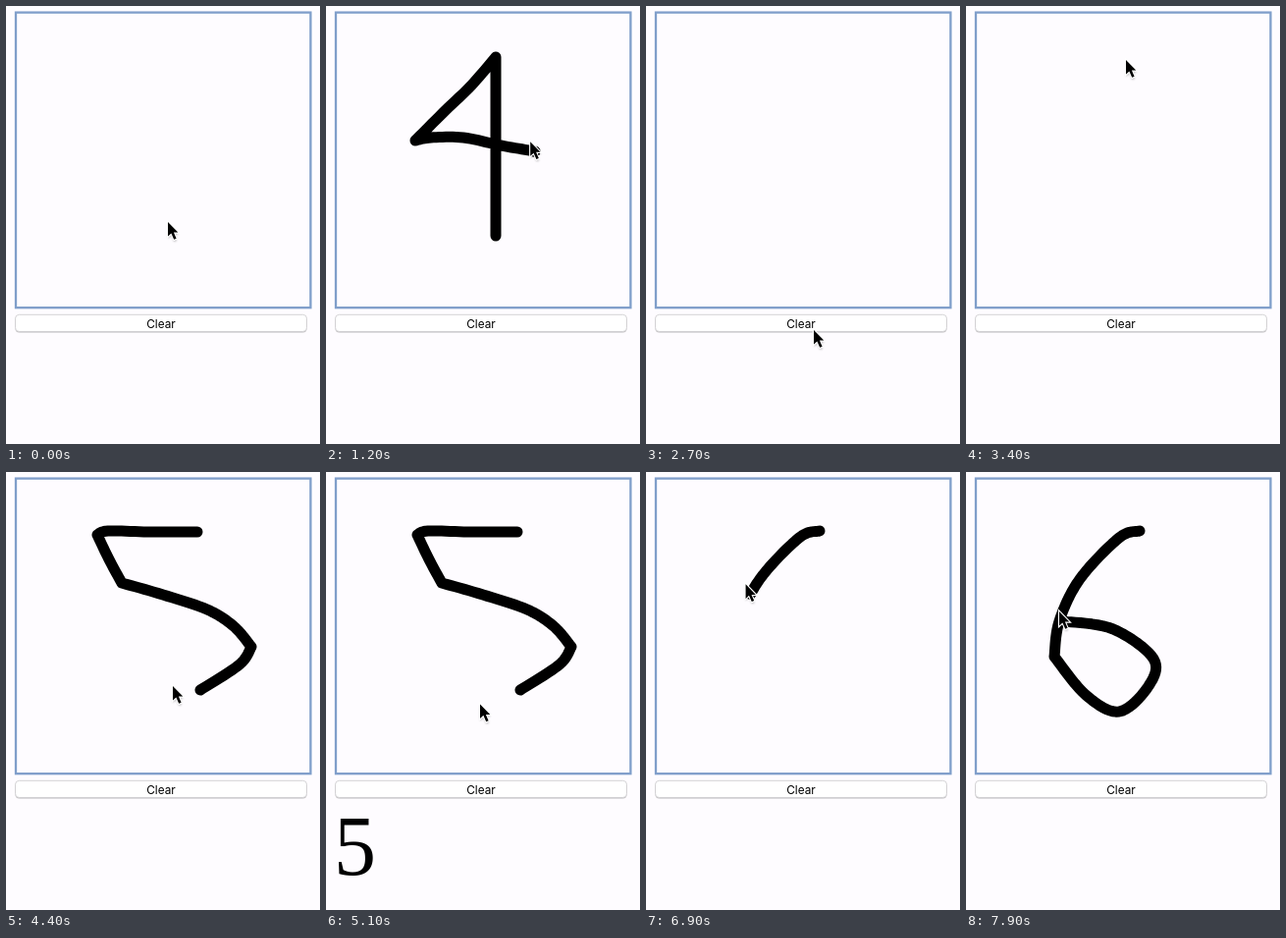
These frames come from a looping animation (320x446 px, 8 s). An HTML page:

```html
<!DOCTYPE html>
<html lang="en">
<head>
<meta charset="utf-8">
<title>Digit pad</title>
<style>
  html, body { margin: 0; width: 100%; height: 100%; overflow: hidden; background: #fefcff; }
  svg { display: block; width: 100vw; height: 100vh; }
  .label { font: 11.8px Inter, "Open Sans", sans-serif; text-anchor: middle; }
  .guess { font: 86px "Liberation Serif", "Times New Roman", serif; }
</style>
</head>
<body>
<svg viewBox="0 0 320 446">
  <defs>
    <linearGradient id="press" x2="0" y2="1">
      <stop stop-color="#62a8f8"/>
      <stop offset="1" stop-color="#1768e6"/>
    </linearGradient>
    <filter id="soft" x="-50%" y="-50%" width="200%" height="200%">
      <feGaussianBlur stdDeviation="1"/>
    </filter>
  </defs>
  <rect width="320" height="446" fill="#fefcff"/>
  <rect x="10" y="6.6" width="300.4" height="300.6" fill="none" stroke="#7f9eca" stroke-width="2.3"/>
  <path id="ink" fill="none" stroke="#000" stroke-width="11" stroke-linecap="round" stroke-linejoin="round"/>
  <rect x="9.5" y="315" width="297" height="17.5" rx="4" fill="#bcbbbd"/>
  <rect id="button" x="9.5" y="314.3" width="297" height="17.2" rx="4" fill="#fff" stroke="#d0cfd1" stroke-width=".9"/>
  <text id="label" class="label" x="158" y="327.6">Clear</text>
  <text id="guess" class="guess" x="8" y="410.3"></text>
  <g id="cursor">
    <path d="M0 2V17L3.6 13.5L6.4 20L9 19L6.2 12.6H11Z" opacity=".3" filter="url(#soft)"/>
    <path d="M0 0V14.6L3.4 11.4L6.2 17.8L8.6 16.8L5.9 10.6H10.3Z" stroke="#fff" stroke-width="2.2" paint-order="stroke"/>
  </g>
</svg>
<script>
const LOOP = 8000, STEP = 100;
const PEN = [5, 10]; // pen tip relative to the pointer
const $ = id => document.getElementById(id);
const clamp = u => Math.min(1, Math.max(0, u));
const easeOut = u => Math.sin(u * Math.PI / 2);
const smooth = u => u * u * (3 - 2 * u);

// Catmull-Rom point; the whole part of pos is the index of the key point
function spline(pts, pos) {
  const i = Math.min(Math.floor(pos), pts.length - 2), u = pos - i;
  const b = pts[i], c = pts[i + 1], a = pts[i - 1] || b, d = pts[i + 2] || c;
  return b.map((p, n) => p + u / 2 * (c[n] - a[n]
    + u * (2 * a[n] - 5 * p + 4 * c[n] - d[n]
    + u * (3 * (p - c[n]) + d[n] - a[n]))));
}

const legs = [];
let spot = [165, 220];

// the pen draws through pts
function ink(start, end, ...pts) {
  legs.push({ start, end, pts, pen: true, ease: easeOut });
  spot = pts[pts.length - 1].map((v, n) => v - PEN[n]);
}

// the pointer travels on from where it is
function glide(start, end, ...pts) {
  legs.push({ start, end, pts: [spot, ...pts], ease: smooth });
  spot = pts[pts.length - 1];
}

glide(0, 200, [168, 224]);
ink(200, 500, [173,234], [173,52]);
ink(500, 900, [173,52], [148,81], [122,106], [91,137]);
ink(900, 1400, [91,137], [107,134], [140,134], [178,142], [212,148], [232,153]);
glide(1500, 2200, [180,295], [171,330]);
glide(2900, 3400, [163,55]);
glide(3400, 3600, [190,51]);

ink(3600, 3800, [195,61], [145,61], [104,60], [93,64]);
ink(3800, 4000, [93,64], [105,89], [118,113]);
ink(4000, 4200, [118,113], [160,125], [205,140], [232,157], [250,178]);
ink(4200, 4300, [250,178], [238,196], [198,222]);
glide(4300, 4400, [170,218]);
glide(4400, 4700, [163,229], [157,213]);
glide(4800, 5700, [157,323]);
glide(5900, 6600, [137,195], [172,50]);

ink(6700, 7200, [177,60], [156,67], [116,109], [95,152], [90,188]);
ink(7200, 7900, [90,188], [122,227], [156,244], [186,218], [191,190], [150,160], [100,152]);

const digits = [
  { name: '4', shown: 2000, clear: 2700 },
  { name: '5', shown: 4900, clear: 5800 }
];

const progress = (leg, t) =>
  leg.ease(clamp((t - leg.start) / (leg.end - leg.start))) * (leg.pts.length - 1);

function trace(leg, t) {
  const end = progress(leg, t), line = [];
  for (let pos = 0; pos < end; pos += 0.1) line.push(spline(leg.pts, pos));
  return 'M' + [...line, spline(leg.pts, end)].join('L');
}

function draw(t) {
  const leg = legs.filter(l => l.start <= t).pop();
  let pointer = spline(leg.pts, progress(leg, t));
  if (leg.pen) pointer = pointer.map((v, n) => v - PEN[n]);

  const wiped = Math.max(0, ...digits.map(d => d.clear).filter(c => c <= t));
  const drawn = legs.filter(l => l.pen && l.start >= wiped && l.start < t);
  const guess = digits.find(d => t >= d.shown && t < d.clear);
  const pressed = t >= 2600 && t < 2700;

  $('ink').setAttribute('d', drawn.map(l => trace(l, t)).join(''));
  $('guess').textContent = guess ? guess.name : '';
  $('button').setAttribute('fill', pressed ? 'url(#press)' : '#fff');
  $('label').setAttribute('fill', pressed ? '#fff' : '#000');
  $('cursor').setAttribute('transform', `translate(${pointer})`);
}

const began = performance.now();
function tick() {
  const t = (performance.now() - began) % LOOP;
  draw(Math.floor(t / STEP) * STEP);
  requestAnimationFrame(tick);
}
tick();
</script>
</body>
</html>
```
